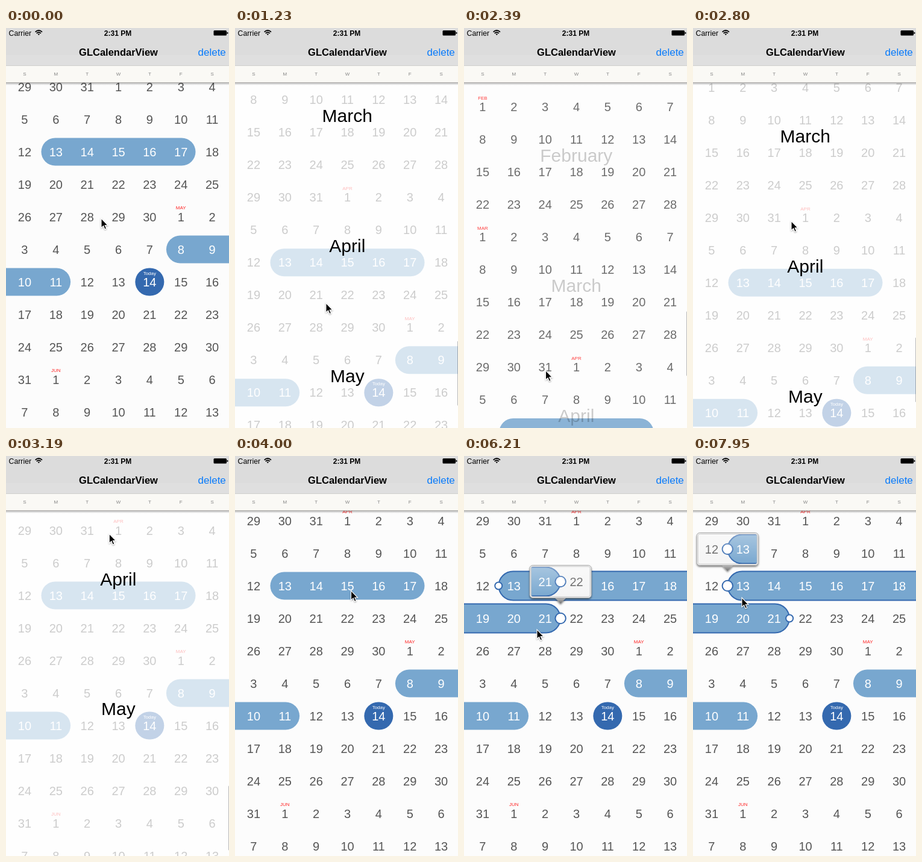
Recreate the animation shown at these times as an HTML page. Size 370 by 664 pixels, loop 8 s.

```html
<!DOCTYPE html>
<html lang="en">
<head>
<meta charset="utf-8">
<title>GLCalendarView</title>
<style>
html, body { margin: 0; width: 100%; height: 100%; overflow: hidden; background: #fcfcfc; }
svg { display: block; width: 370px; height: 664px; font-family: "Liberation Sans", Arial, sans-serif; }
.mid text, text.mid { text-anchor: middle; }
.day { font-size: 20px; fill: #555; }
.tag { font-size: 8px; fill: #f22; }
.month { font-size: 30px; fill: #000; }
.week { font-size: 8px; fill: #858585; }
</style>
</head>
<body>
<svg viewBox="0 0 370 664">
  <defs>
    <linearGradient id="shade" x2="0" y2="1">
      <stop stop-color="#000" stop-opacity=".34"/><stop offset="1" stop-color="#000" stop-opacity="0"/>
    </linearGradient>
    <linearGradient id="gloss" x2="0" y2="1">
      <stop stop-color="#fff" stop-opacity=".36"/><stop offset="1" stop-color="#fff" stop-opacity="0"/>
    </linearGradient>
    <linearGradient id="tip" x2="0" y2="1">
      <stop stop-color="#c4c4c4"/><stop offset="1" stop-color="#6f6f6f"/>
    </linearGradient>
    <filter id="soft" x="-20%" y="-20%" width="140%" height="150%">
      <feDropShadow dx="0" dy="2" stdDeviation="1.5" flood-opacity=".5"/>
    </filter>
    <filter id="drop" x="-50%" y="-30%" width="200%" height="180%">
      <feDropShadow dx="0" dy="1" stdDeviation=".8" flood-opacity=".4"/>
    </filter>
    <clipPath id="lens"><rect x="-49" y="-25" width="98" height="50" rx="3"/></clipPath>
  </defs>
  <rect width="370" height="664" fill="#fcfcfc"/>
  <g id="cal" class="mid"><g id="fixed"></g><g id="range"></g><g id="cells"></g><g id="knobs"></g></g>
  <rect id="veil" y="90" width="370" height="574" fill="#fff"/>
  <g id="months" class="mid"></g>
  <rect id="bar" x="369" width="3" height="107" rx="1" fill="#000"/>
  <g id="mag">
    <g filter="url(#soft)">
      <path d="M-10 26H10L0 36.5Z" fill="url(#tip)"/>
      <rect x="-51" y="-27" width="102" height="54" rx="5" fill="#fafafa" stroke="#a2a2a2"/>
    </g>
    <g clip-path="url(#lens)">
      <rect x="-50" y="-26" width="100" height="52" fill="#f5f5f5"/>
      <use id="copy" href="#cal"/>
      <rect x="-50" y="-26" width="100" height="52" fill="url(#gloss)"/>
    </g>
    <rect x="-49" y="-25" width="98" height="50" rx="3" fill="none" stroke="#c6c6c6"/>
  </g>
  <g id="head">
    <rect y="90" width="370" height="5" fill="url(#shade)"/>
    <rect width="370" height="63" fill="#dfdfdf"/>
    <rect width="370" height="45" fill="#dcdcdc"/>
    <rect y="62" width="370" height="28.5" fill="#faf9f5"/>
    <rect y="62" width="370" height="1" fill="#cfcfcd"/>
    <rect y="90" width="370" height="1" fill="#b5b3b0"/>
    <text x="4.5" y="12.6" font-size="12.3">Carrier</text>
    <g fill="none" stroke="#000" stroke-width="1.7">
      <path d="M48.6 6.6Q54.3 1.4 60 6.6M50.7 8.9Q54.3 5.6 57.9 8.9"/>
      <path d="M52.6 10.2Q54.3 8.8 56 10.2L54.3 12Z" fill="#000" stroke="none"/>
    </g>
    <text class="mid" x="185.5" y="12.6" font-size="12" font-weight="700">2:31 PM</text>
    <rect x="344.5" y="4" width="21.5" height="8.5" rx="1.5"/>
    <path d="M366.5 6.5q2 .3 2 1.8t-2 1.8z"/>
    <text class="mid" x="186.5" y="46.3" font-size="16.5" font-weight="700">GLCalendarView</text>
    <text x="318.5" y="46.3" font-size="17" fill="#087bfb">delete</text>
  </g>
  <path id="arrow" d="M0 0V15.4L3.6 12.2L6 17.8L8.6 16.7L6.2 11.3H11Z" stroke="#fff" stroke-width="1.1" filter="url(#drop)"/>
</svg>
<script>
const $ = id => document.getElementById(id);
const ROW = 54, COL = 51.857, X0 = 30.93, TOP = 205.5, LOOP = 8000;
const BLUE = '#78a7cf', DEEP = '#3469af', TODAY = 32;
const NAMES = ['January', 'February', 'March', 'April', 'May', 'June', 'July'];
const weekOf = n => Math.floor(n / 7);
const colX = n => X0 + COL * (n - 7 * weekOf(n));

// Day 0 is Sunday, April 12th, 2015.
const cells = new Map();
let html = '', monthHtml = '';
for (let n = -84; n < 77; n++) {
  const date = new Date(Date.UTC(2015, 3, 12 + n));
  const d = date.getUTCDate(), name = NAMES[date.getUTCMonth()];
  const x = colX(n), y = weekOf(n) * ROW;
  html += `<text class="day" data-n="${n}" x="${x}" y="${y + 7.2}">${d}</text>`;
  if (d === 1) html += `<text class="tag" x="${x}" y="${y - 12.2}">${name.slice(0, 3).toUpperCase()}</text>`;
  if (n === TODAY) html += `<text class="tag" style="fill:#fff" x="${x}" y="${y - 12}">Today</text>`;
  if (d === 15) monthHtml += `<text class="month" x="186.3" y="${y - 17.1}">${name}</text>`;
}
$('cells').innerHTML = html;
$('months').innerHTML = monthHtml;
for (const el of $('cells').querySelectorAll('.day')) cells.set(+el.dataset.n, el);

[...'SMTWTFS'].forEach((s, i) => $('head').insertAdjacentHTML('beforeend',
  `<text class="week mid" x="${X0 + COL * i}" y="78.8">${s}</text>`));

function pills(a, b, edit) {
  const pad = edit ? 25.3 : 24.3, h = edit ? 48 : 46;
  let out = '';
  for (let w = weekOf(a); w <= weekOf(b); w++) {
    const l = w === weekOf(a) ? colX(a) - pad : -40;
    const r = w === weekOf(b) ? colX(b) + pad : 410;
    out += `<rect x="${l}" y="${w * ROW - h / 2}" width="${r - l}" height="${h}" rx="${h / 2}" fill="${BLUE}"`
      + (edit ? ` stroke="${DEEP}" stroke-width="2"/>` : '/>');
  }
  return out;
}
const knob = (n, side, r) =>
  `<circle cx="${colX(n) + side * 25.5}" cy="${weekOf(n) * ROW}" r="${r}" fill="#fff" stroke="${DEEP}" stroke-width="2"/>`;

$('fixed').innerHTML = pills(26, 29, false)
  + `<rect x="${colX(TODAY) - 24}" y="${weekOf(TODAY) * ROW - 23}" width="48" height="46" rx="23" fill="${DEEP}"/>`;

// Pointer stops: time, x, y, power (positive eases in, negative eases out)
const PATH = [
  [0, 158, 317], [120, 158, 317], [550, 160, 274], [1230, 151, 457, 2], [1690, 131.5, 602, -1.6],
  [2250, 132, 601], [2800, 163, 322, 1.6], [3290, 172, 114, -1.6], [3500, 172, 114],
  [4000, 192.5, 224.5, -1.5], [4500, 192.5, 224.5], [4880, 293, 218, -1.4], [5020, 293, 218],
  [5200, 330, 222], [5350, 334, 262], [5520, 318, 308], [5850, 121, 322, -1.4], [6000, 121, 322],
  [6210, 121, 289], [6380, 121, 278], [6700, 121, 278], [7060, 74, 222, -1.4], [7160, 74, 222],
  [7430, 88, 164], [7580, 88, 160], [7950, 81, 236, -1.4], [LOOP, 81, 236]
];
const clamp = v => Math.min(1, Math.max(0, v));
const ramp = (t, a, b) => { const u = clamp((t - a) / (b - a)); return u * u * (3 - 2 * u); };

function pointer(t) {
  const i = PATH.findIndex(p => p[0] > t);
  const [t0, x0, y0] = PATH[i - 1], [t1, x1, y1, p = 1] = PATH[i];
  const u = (t - t0) / (t1 - t0);
  const k = p > 0 ? u ** p : 1 - (1 - u) ** -p;
  return [x0 + (x1 - x0) * k, y0 + (y1 - y0) * k];
}

// Drag, glide after release, drag back
function scroll(t, y) {
  if (t < 550) return 0;
  if (t < 1230) return y - 274;
  if (t < 2250) return 183 + 361 * (1 - Math.exp((1230 - t) / 500));
  return t < 3290 ? y - 104 : 10;
}

const dayAt = t => {
  const [x, y] = pointer(t);
  return 7 * Math.round((y - TOP - 10) / ROW) + Math.floor((x - X0) / COL + .5);
};

function state(t) {
  const dragEnd = t >= 5050 && t < 6560, dragStart = t >= 7130;
  const b = t < 5050 ? 5 : dayAt(Math.min(t, 6500));
  return { a: dragStart ? dayAt(t) : 1, b: t >= 6560 ? 9 : b, edit: t >= 4300, dragEnd, dragStart };
}

let last = '';
function showRange(s) {
  const key = Object.values(s).join();
  if (key === last) return;
  last = key;
  $('range').innerHTML = pills(s.a, s.b, s.edit);
  $('knobs').innerHTML = s.edit ? knob(s.a, -1, s.dragStart ? 8.7 : 6) + knob(s.b, 1, s.dragEnd ? 8.7 : 6) : '';
  for (const [n, el] of cells) {
    const lit = n >= s.a && n <= s.b || n >= 26 && n <= 29 || n === TODAY;
    el.style.fill = lit ? '#fff' : '';
  }
  const on = s.dragEnd || s.dragStart;
  $('mag').style.display = on ? '' : 'none';
  if (!on) return;
  const n = s.dragEnd ? s.b : s.a;
  const x = colX(n) + (s.dragEnd ? 25.5 : -25.5), y = TOP + 10 + weekOf(n) * ROW - 61;
  $('mag').setAttribute('transform', `translate(${x} ${y})`);
  $('copy').setAttribute('transform', `translate(${-x} ${-y - 61})`);
}

function draw(t) {
  const [x, y] = pointer(t), off = scroll(t, y);
  const move = `translate(0 ${TOP + off})`;
  $('cal').setAttribute('transform', move);
  $('months').setAttribute('transform', move);
  const k = ramp(t, 550, 1010) - ramp(t, 1420, 1880) + ramp(t, 2260, 2720) - ramp(t, 3510, 3970);
  $('veil').setAttribute('opacity', k * .7);
  $('months').setAttribute('opacity', k);
  $('bar').setAttribute('y', 552 - .175 * off);
  $('bar').setAttribute('opacity', .27 * (ramp(t, 550, 650) - ramp(t, 3510, 3760)));
  showRange(state(t));
  $('arrow').setAttribute('transform', `translate(${x} ${y - .8})`);
}

const start = performance.now();
function tick() {
  draw((performance.now() - start) % LOOP);
  requestAnimationFrame(tick);
}
tick();
</script>
</body>
</html>
```
